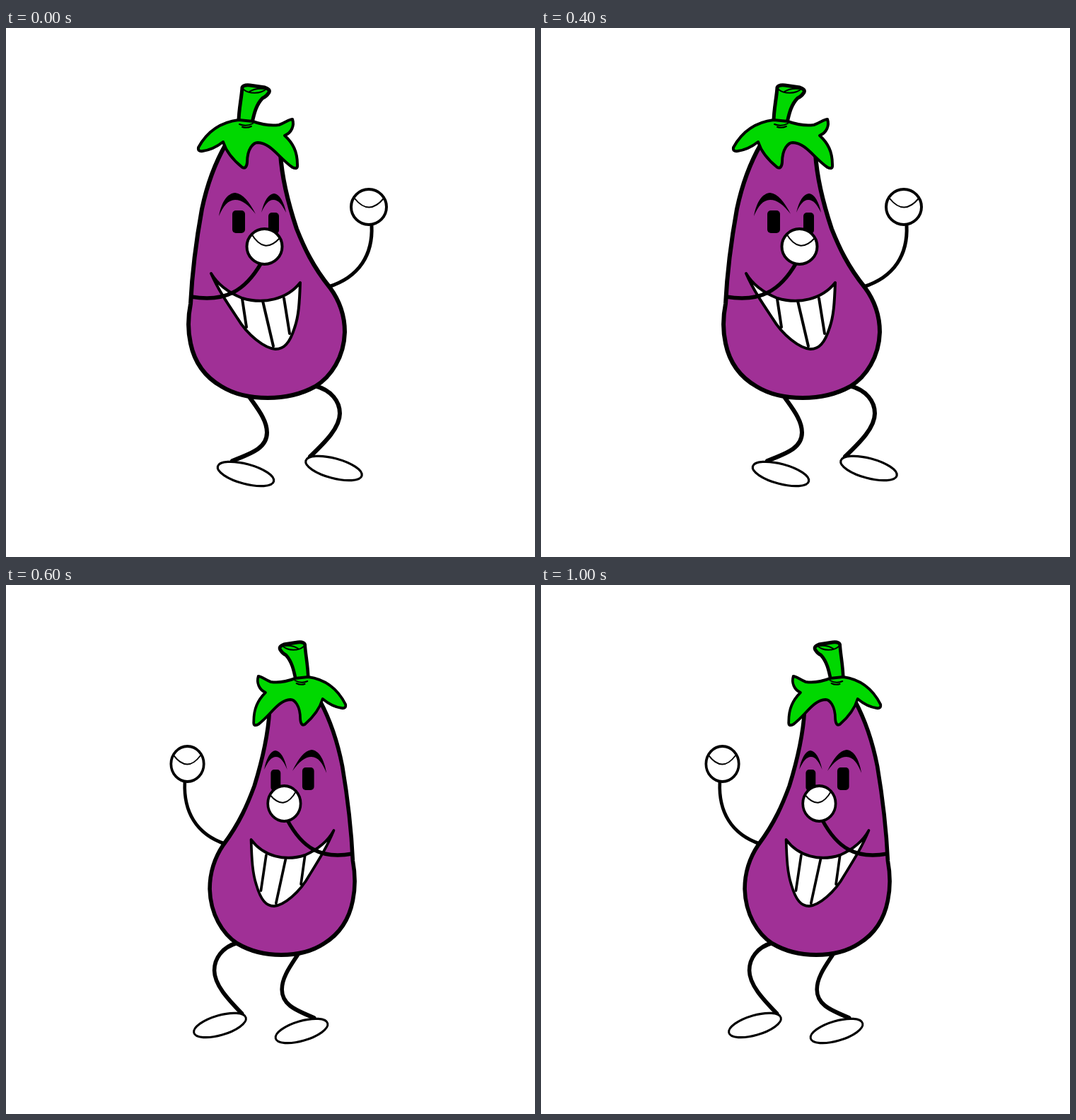
Write an HTML page with a canvas that moves like this. It is 748 px wide and 748 px high and loops after 1200 ms.

```html
<!DOCTYPE html>
<html lang="en">
<head>
<meta charset="utf-8">
<title>Dancing eggplant</title>
<style>
  html, body { margin: 0; width: 100%; height: 100%; overflow: hidden; background: #fff; }
  canvas { display: block; width: 748px; height: 748px; }
</style>
</head>
<body>
<canvas id="stage" width="748" height="748"></canvas>
<script>
const ctx = document.getElementById('stage').getContext('2d');
const STEP = 200;
const PURPLE = '#a03096', GREEN = '#00d800', WHITE = '#fff', INK = '#000';

const shapes = {
  body: 'M311 164C296 190 284 223 277 256C269 300 263 350 261 390C257 410 257 428 261 446C267 475 284 495 305 507C323 518 345 523 370 523C394 523 417 518 437 507C460 493 478 465 479 430C479 408 472 386 458 367C433 336 421 309 411 284C400 251 390 210 388 178L350 150Z',
  calyx: 'M329 130C305 133 285 145 272 169Q271 175 278 174Q293 172 307 161Q313 180 334 197Q340 200 341 190C341 170 350 162 356 162C375 163 385 183 405 197Q413 201 412 193C412 175 406 163 394 152C404 148 408 138 405 129C400 129 395 134 386 137C372 139 360 136 349 132Z',
  stem: 'M329 133C329 115 333 100 334 84Q336 80 345 81L366 84Q374 87 372 91Q368 97 363 99C354 108 351 120 348 134',
  stemLines: 'M336 87C343 93 360 94 368 86M344 90Q353 85 364 86M330 136Q340 140 349 135M334 140Q341 142 347 139',
  brows: 'M301 266C305 245 313 234 324 233C335 234 344 246 353 263C343 250 334 243 324 243C314 243 307 252 301 266ZM361 261C365 244 371 235 379 234C387 235 393 246 396 261C390 249 385 243 378 243C371 243 366 250 361 261Z',
  mouth: 'M290 347C300 364 317 375 334 382C364 391 397 384 416 360C415 388 414 407 408 424C401 446 393 454 381 454C366 453 342 435 327 410C313 389 300 370 290 347Z',
  teeth: 'M334 383L340 423M363 386L378 450M393 382L401 432'
};
for (const key in shapes) shapes[key] = new Path2D(shapes[key]);

const poses = [
  {
    tilt: 0, neck: [341, 135], flipX: 732.6, flipY: 0,
    legs: 'M345 523C357 540 369 555 369 572C369 592 352 600 320 612M437 506C460 512 472 528 472 545C472 565 452 585 430 606',
    legWidth: 6,
    backArm: 'M517 279C519 320 500 352 456 366',
    frontArm: 'M262 380C310 388 338 372 361 332',
    backFist: [513, 253, 'M493 241Q513 266 534 241'],
    frontFist: [365.5, 309, 'M347 291Q365 321 387 297']
  },
  {
    tilt: -25.3, neck: [272, 164], flipX: 731.2, flipY: 0.7,
    legs: 'M373 510L319 613M497 482L436 606',
    legWidth: 5,
    backArm: 'M479 281C488 295 491 312 488 330',
    frontArm: 'M291 391C278 405 280 436 305 437C330 436 345 408 347 379',
    backFist: [466, 259, 'M443 257Q476 265 480 239'],
    frontFist: [347, 354, 'M326 343Q346 362 368 339']
  }
];
for (const p of poses)
  for (const key of ['legs', 'backArm', 'frontArm']) p[key] = new Path2D(p[key]);

function line(path, width) {
  ctx.lineWidth = width;
  ctx.stroke(path);
}

function shape(path, fill, width) {
  ctx.fillStyle = fill;
  ctx.fill(path);
  if (width) line(path, width);
}

function oval(x, y, rx, ry, deg, width) {
  const path = new Path2D();
  path.ellipse(x, y, rx, ry, deg * Math.PI / 180, 0, Math.PI * 2);
  shape(path, WHITE, width);
}

function eye(x, y, w, h) {
  const path = new Path2D();
  path.roundRect(x, y, w, h, 5);
  shape(path, INK);
}

function fist([x, y, crease]) {
  oval(x, y, 25, 25, 0, 4);
  line(new Path2D(crease), 2);
}

function eggplant(pose) {
  ctx.save();
  ctx.translate(...pose.neck);
  ctx.rotate(pose.tilt * Math.PI / 180);
  ctx.translate(-341, -135);
  shape(shapes.body, PURPLE, 6);
  shape(shapes.stem, GREEN, 5);
  shape(shapes.calyx, GREEN, 4);
  line(shapes.stemLines, 2);
  shape(shapes.brows, INK);
  eye(320, 258, 18, 32);
  eye(371, 261, 15, 30);
  shape(shapes.mouth, WHITE, 4);
  line(shapes.teeth, 4);
  ctx.restore();
}

function draw(pose, mirrored) {
  ctx.setTransform(1, 0, 0, 1, 0, 0);
  ctx.fillStyle = WHITE;
  ctx.fillRect(0, 0, 748, 748);
  if (mirrored) ctx.setTransform(-0.928, 0, 0, 1, pose.flipX, pose.flipY);
  ctx.strokeStyle = INK;
  ctx.lineJoin = 'round';
  ctx.lineCap = 'round';

  line(pose.legs, pose.legWidth);
  oval(339, 630.5, 41, 14, 15, 3.2);
  oval(463.5, 622.5, 41, 14, 15, 3.2);
  line(pose.backArm, 5);
  fist(pose.backFist);
  eggplant(pose);
  line(pose.frontArm, 5.5);
  fist(pose.frontFist);
}

// Sway out and back on one side, then the same on the other.
function tick() {
  const beat = Math.floor(performance.now() / STEP) % 6;
  draw(poses[beat % 3 === 1 ? 1 : 0], beat >= 3);
  requestAnimationFrame(tick);
}
tick();
</script>
</body>
</html>
```
